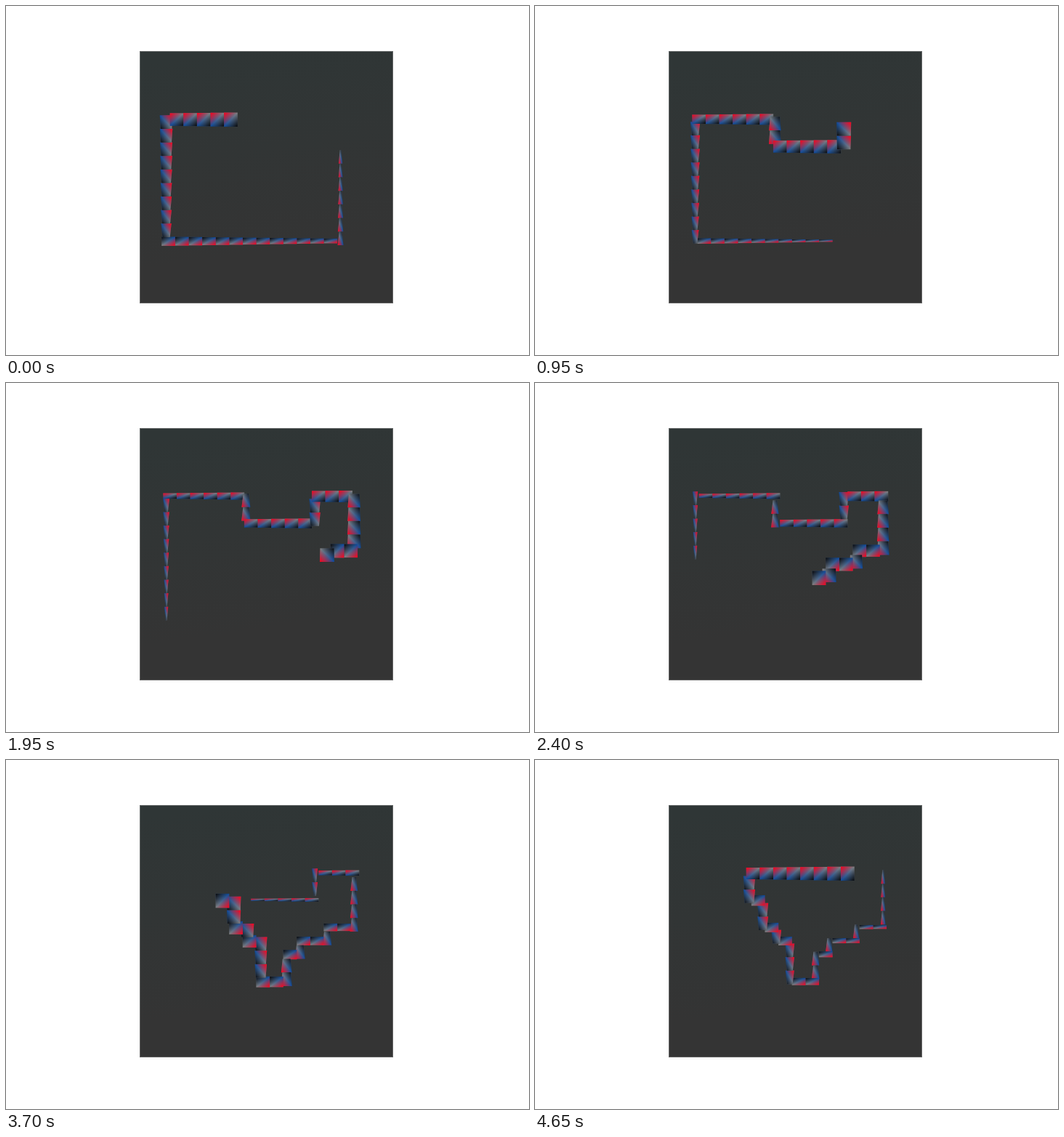
These frames come from a looping animation (720 px wide and 480 px high, 4700 ms). An HTML page with a canvas:

```html
<!DOCTYPE html>
<html>
<head>
<meta charset="utf-8">
<style>
html, body { margin: 0; width: 100%; height: 100%; overflow: hidden; background: #fff; }
canvas { display: block; }
</style>
</head>
<body>
<canvas width="720" height="480"></canvas>
<script>
const ctx = document.querySelector('canvas').getContext('2d');
const LOOP = 4700, STEP = 50, MS_PER_CELL = 100;
const BLOCKS = 34, START = 35.81;
const CELL_X = 18.6, CELL_Y = 18.65, LEFT = 220, TOP = 156.3;

// dx, dy, block rotation and sideways offset of each heading
const HEADINGS = {
  R: [1, 0, 0, 0],
  L: [-1, 0, Math.PI, 0],
  U: [0, -1, Math.PI / 2, 0.6],
  D: [0, 1, -Math.PI / 2, -1.2]
};
const ROUTE = 'D9 L13 U9 R6 D2 R5 U2 R3 D4 L2 D1 L2 D1 L1 D2 L2 U3 L1 U1 L1 U2 L1 U2 R12'
  .split(' ').map(move => [HEADINGS[move[0]], +move.slice(1)]);

function gradient(x0, y0, x1, y1, from, to) {
  const g = ctx.createLinearGradient(x0, y0, x1, y1);
  g.addColorStop(0, from);
  g.addColorStop(1, to);
  return g;
}

// Corner colours of a unit square: red, grey, black and blue, clockwise
const SHADES = [
  gradient(-0.5, 0.5, 0.5, -0.5, '#0c4a9c', '#808080'),
  gradient(-0.5, -0.5, 0, 0, 'rgb(255,0,24)', 'rgba(255,0,24,0)'),
  gradient(0.5, 0.5, 0, 0, 'rgb(8,8,8)', 'rgba(8,8,8,0)')
];
const BACKDROP = gradient(300, 62, 340, 340, '#2f3636', '#343434');

function locate(distance) {
  let x = 13, y = 0;
  for (const [heading, length] of ROUTE) {
    const d = Math.min(distance, length);
    x += heading[0] * d;
    y += heading[1] * d;
    if (distance <= length) return { x, y, heading };
    distance -= length;
  }
}

function drawBlock(k, distance) {
  const { x, y, heading: [, dy, angle, shift] } = locate(distance);
  const width = dy ? 20 - 0.45 * k : 19.5 - 0.5 * k;
  const pinch = dy ? 0.02 + 0.009 * k : 0;
  ctx.save();
  ctx.translate(LEFT + x * CELL_X + shift, TOP + y * CELL_Y - k * 0.04);
  ctx.rotate(angle);
  ctx.scale(18.8, width);
  ctx.beginPath();
  ctx.moveTo(-0.5, -0.5);
  ctx.lineTo(0.5, pinch - 0.5);
  ctx.lineTo(0.5, 0.5 - pinch);
  ctx.lineTo(-0.5, 0.5);
  for (const shade of SHADES) {
    ctx.fillStyle = shade;
    ctx.fill();
  }
  ctx.restore();
}

function draw(now) {
  const time = Math.floor(now % LOOP / STEP) * STEP;
  const head = START + time / MS_PER_CELL;
  ctx.fillStyle = '#fff';
  ctx.fillRect(0, 0, 720, 480);
  ctx.fillStyle = BACKDROP;
  ctx.fillRect(184, 62, 349, 347);
  ctx.setLineDash([1, 1]);
  ctx.strokeStyle = '#999';
  ctx.strokeRect(184.5, 62.5, 348, 346);
  for (let k = BLOCKS - 1; k >= 0; k--) drawBlock(k, head - k);
}

const start = performance.now();
function tick() {
  draw(performance.now() - start);
  requestAnimationFrame(tick);
}
tick();
</script>
</body>
</html>
```
